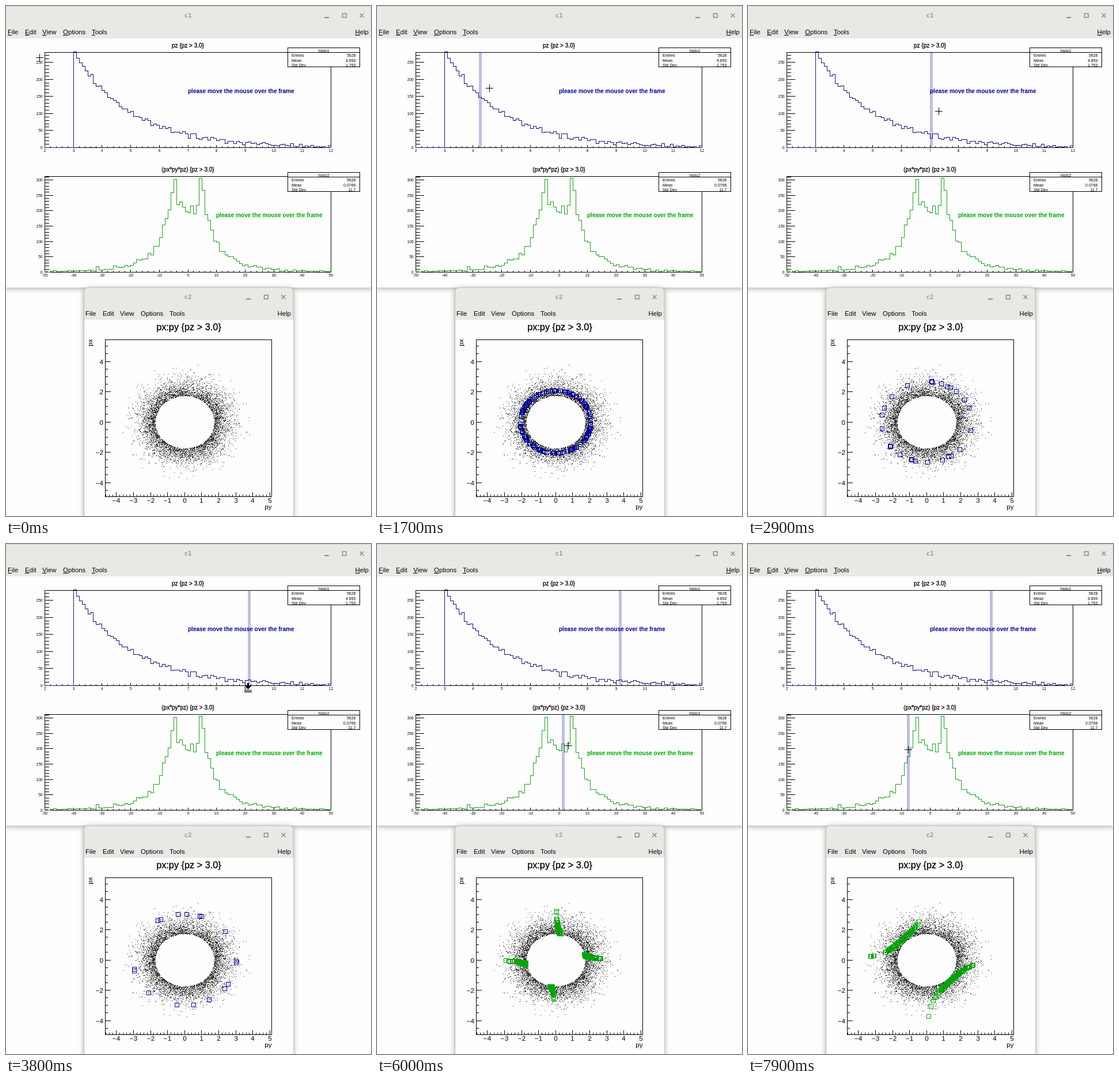
Write an HTML page that moves like this. It is 634 by 884 pixels and loops after 8 s.

```html
<!DOCTYPE html>
<html lang="en">
<head>
<meta charset="utf-8">
<title>Linked histograms</title>
<style>
html, body { margin: 0; width: 100%; height: 100%; overflow: hidden; background: #fdfdfc; }
svg { display: block; width: 634px; height: 884px; }
text { font-family: "Liberation Sans", Arial, sans-serif; fill: #000; white-space: pre; }
.crisp { shape-rendering: crispEdges; }
.win { filter: drop-shadow(0 2px 5px rgba(0, 0, 0, .32)); }
.name { font: 600 11px "DejaVu Sans Mono", monospace; fill: #999; }
.title { stroke: #000; stroke-width: .3px; }
path { fill: none; }
</style>
</head>
<body>
<svg id="stage" viewBox="0 0 634 884"></svg>
<script>
const NS = 'http://www.w3.org/2000/svg';
const stage = document.getElementById('stage');
const BLUE = '#000094', GREEN = '#00a505', INK = '#000', CHROME = '#e8e8e5', PAPER = '#fefefe';

function add(tag, attrs, parent = stage) {
  const el = document.createElementNS(NS, tag);
  for (const k in attrs) el.setAttribute(k, attrs[k]);
  parent.appendChild(el);
  return el;
}
function label(str, x, y, size, anchor = 'start', extra = {}) {
  const el = add('text', { x, y, 'font-size': size, 'text-anchor': anchor, ...extra });
  el.textContent = str;
  return el;
}
const line = (d, stroke = INK, width = 1) =>
  add('path', { d, stroke, 'stroke-width': width, class: 'crisp' });
const box = (x, y, width, height, fill, stroke = 'none') =>
  add('rect', { x, y, width, height, fill, stroke, class: 'crisp' });
const snap = v => Math.floor(v) + 0.5;

let seed = 20117;
function rnd() {
  seed = (seed * 1664525 + 1013904223) % 4294967296;
  return seed / 4294967296;
}

// ---- data: px, py are normal, pz = px² + py² > 3; py runs along x ----
const COUNT = 5628, SPREAD = 60;
const CX = 310.3, CY = 721, SX = 29.65, SY = 26.25;

const points = Array.from({ length: COUNT }, (_, k) => {
  const u = 0.002 + 0.998 * ((k + SPREAD * rnd()) % COUNT) / COUNT;
  const pz = 3 - 2 * Math.log(u);
  const angle = rnd() * 2 * Math.PI;
  const py = Math.sqrt(pz) * Math.cos(angle), px = Math.sqrt(pz) * Math.sin(angle);
  return {
    x: Math.round(CX + py * SX),
    y: Math.round(CY - px * SY),
    bins: [Math.floor((pz - 2) * 10), Math.floor(px * py * pz) + 50]
  };
});

function histogram(n) {
  const counts = Array(100).fill(0);
  for (const p of points) if (p.bins[n] in counts) counts[p.bins[n]]++;
  return counts;
}

// ---- windows ----
function buttons(x, y) {
  line(`M${x} ${y + 20}h8`, '#8a8a8a', 2);
  add('path', {
    d: `M${x + 31.5} ${y + 13.2}h6.6v6.6h-6.6zM${x + 61.5} ${y + 13}l7 7m0 -7l-7 7`,
    stroke: '#8a8a8a', 'stroke-width': 1.5
  });
}
function chrome(x, y, w, name, underline) {
  label(name, x + w / 2 - 1, y + 20, 11, 'middle', { class: 'name' });
  ['File', 'Edit', 'View', 'Options', 'Tools', 'Help'].forEach((word, i) => {
    const left = word === 'Help' ? x + w - 27.5 : x + 3 + [0, 30, 60, 96, 146][i];
    const el = label('', left, y + 49, 11.4);
    add('tspan', underline ? { 'text-decoration': 'underline' } : {}, el).textContent = word[0];
    add('tspan', {}, el).textContent = word.slice(1);
  });
}

add('rect', { x: -2, y: -2, width: 638, height: 490, fill: CHROME, class: 'win' });
line('M0 .5H634', '#cfcfcc');
box(0, 56, 634, 432, PAPER);
chrome(0, 0, 634, 'c1', true);
buttons(553, 0);

add('path', {
  d: 'M135.5 890V496q0 -8 8 -8H491q8 0 8 8V890z',
  style: `fill:${CHROME}`, stroke: '#bcbcb8', class: 'win'
});
box(136, 544, 363, 340, PAPER);
chrome(135, 488, 364, 'c2', false);
buttons(417, 488);

// ---- upper pads ----
const LEFT = 67.5, BIN = 4.97;

function drawPad(p, n) {
  label(p.title, 316, p.top - 9, 10, 'middle', { class: 'title' });
  line(`M${LEFT} ${p.top}H564.5V${p.base}H${LEFT}z`);

  let ticks = '';
  for (let v = 0; v <= p.max; v += 10) {
    const y = snap(p.base - v * p.scale);
    ticks += `M${LEFT} ${y}h${v % 50 ? 7 : 14}`;
    if (v % 50 === 0) label(v, 63.5, y + 2, 6.6, 'end');
  }
  for (let i = 0; i <= 50; i++) {
    const x = snap(LEFT + i * BIN * 2);
    ticks += `M${x} ${p.base}v${i % 5 ? -2.5 : -5}`;
    if (i % 5 === 0) label(p.from + i / 5 * p.step, x, p.base + 7.5, 6.6, 'middle');
  }
  line(ticks);

  let d = `M${LEFT} ${p.base}`;
  histogram(n).forEach((c, i) => {
    d += `V${snap(p.base - c * p.scale)}H${snap(LEFT + (i + 1) * BIN)}`;
  });
  line(d + `V${p.base}`, p.curve);
  label('please move the mouse over the frame', p.noteX, p.top + 70.7, 10, 'start',
    { 'font-weight': 700, style: `fill:${p.color}` });

  const y = p.statY;
  box(489.5, y, 125, 33, PAPER, INK);
  line(`M489.5 ${y + 8}h125`);
  label(p.name, 552, y + 7, 7, 'middle');
  [['Entries', COUNT], ['Mean', p.mean], ['Std Dev', p.dev]].forEach(([key, value], i) => {
    label(key, 496, y + 15.8 + i * 8.2, 7);
    label(value, 607.5, y + 15.8 + i * 8.2, 7, 'end');
  });
}

const pads = [
  {
    title: 'pz {pz > 3.0}', top: 80.5, base: 245.5, scale: 0.592, max: 270,
    from: 2, step: 1, color: BLUE, curve: '#14147e', noteX: 316,
    statY: 72.5, name: 'histo1', mean: '4.893', dev: '1.763'
  },
  {
    title: '(px*py*pz) {pz > 3.0}', top: 295.5, base: 461.5, scale: 0.5333, max: 310,
    from: -50, step: 10, color: GREEN, curve: '#239c23', noteX: 365,
    statY: 288.5, name: 'histo2', mean: '0.0766', dev: '11.7'
  }
];
pads.forEach(drawPad);

// ---- scatter plot ----
label('px:py {pz > 3.0}', 317.5, 562, 16.3, 'middle', { class: 'title' });
line('M172.5 578.5H461.5V850.5H172.5z');
const signed = v => String(v).replace('-', '\u2212');
let marks = '';
for (let i = -23; i <= 25; i++) {
  const x = snap(CX + i / 5 * SX);
  marks += `M${x} 850.5v${i % 5 ? -4 : -8}`;
  if (i % 5 === 0) label(signed(i / 5), x, 861, 11.7, 'middle');
}
for (let i = -9; i <= 10; i++) {
  const y = snap(CY - i / 2 * SY);
  marks += `M172.5 ${y}h${i % 4 ? 4.5 : 9}`;
  if (i % 4 === 0) label(signed(i / 2), 169, y + 4, 11.7, 'end');
}
line(marks);
label('py', 461.5, 871.5, 11.7, 'end');
label('px', 0, 0, 11.7, 'end', { transform: 'translate(150 577.5) rotate(-90)' });
line(points.map(p => `M${p.x} ${p.y + 0.5}h1`).join(''), '#222');

// ---- moving parts ----
const bands = pads.map(p => add('rect', {
  y: p.top, width: 5, height: p.base - p.top, fill: BLUE, 'fill-opacity': 0.25, class: 'crisp'
}));
const squares = line('', BLUE);
const cursor = add('g', {});
const cross = add('path', { d: 'M-6 .5h13M.5 -6v13', stroke: INK, class: 'crisp' }, cursor);
const arrow = add('path', {
  d: 'M-1 -9h3v5h4l-5.5 6l-5.5 -6h4zM-6 3h13v1h-13zM-6 5.5h13v1.5h-13z', style: 'fill:#000'
}, cursor);

// Pointer path: time, x, y
const track = [
  [200, 58, 89], [300, 61, 92], [400, 61, 92], [700, 84, 70], [1000, 124, 108],
  [1100, 125, 120], [1300, 142, 128], [2000, 234, 152], [2200, 220, 152],
  [3500, 427, 208], [3800, 420, 250], [4200, 439, 305], [5000, 388, 347],
  [5100, 391, 347], [5800, 318, 348], [6000, 332, 349], [6300, 350, 352],
  [7000, 298, 352], [7100, 298, 352], [7500, 272, 354], [7900, 278, 356]
];
const STEP = 100, LOOP = 8000;

function pointer(t) {
  const i = track.findIndex(k => k[0] >= t);
  if (i <= 0) return track[0].slice(1);
  const a = track[i - 1], b = track[i];
  const f = (t - a[0]) / (b[0] - a[0]);
  return [1, 2].map(n => Math.round(a[n] + (b[n] - a[n]) * f));
}

// The highlight trails the pointer by one step and stays after it leaves
function highlight(t) {
  const bins = [null, null];
  let active = -1;
  for (let s = 0; s < t; s += STEP) {
    const [x, y] = pointer(s);
    const n = pads.findIndex(p => y > p.top && y < p.base);
    if (n < 0 || x < LEFT || x > 564) continue;
    bins[n] = Math.floor((x - LEFT) / BIN);
    active = n;
  }
  return { bins, active };
}

const show = (el, on) => { el.style.display = on ? '' : 'none'; };

let shown = -1;
function draw(t) {
  if (t === shown) return;
  shown = t;
  const [x, y] = pointer(t);
  const onAxis = y > 246 && y < 258;
  cursor.setAttribute('transform', `translate(${x} ${y})`);
  show(cross, !onAxis);
  show(arrow, onAxis);

  const { bins, active } = highlight(t);
  bands.forEach((band, i) => {
    show(band, bins[i] !== null);
    band.setAttribute('x', Math.round(LEFT + bins[i] * BIN));
  });
  const picked = active < 0 ? [] : points.filter(p => p.bins[active] === bins[active]);
  if (active >= 0) squares.setAttribute('stroke', pads[active].color);
  squares.setAttribute('d', picked.map(p => `M${p.x - 3.5} ${p.y - 3.5}h7v7h-7z`).join(''));
}

const start = performance.now();
function tick() {
  const t = (performance.now() - start) % LOOP;
  draw(Math.floor(t / STEP) * STEP);
  requestAnimationFrame(tick);
}
tick();
</script>
</body>
</html>
```
